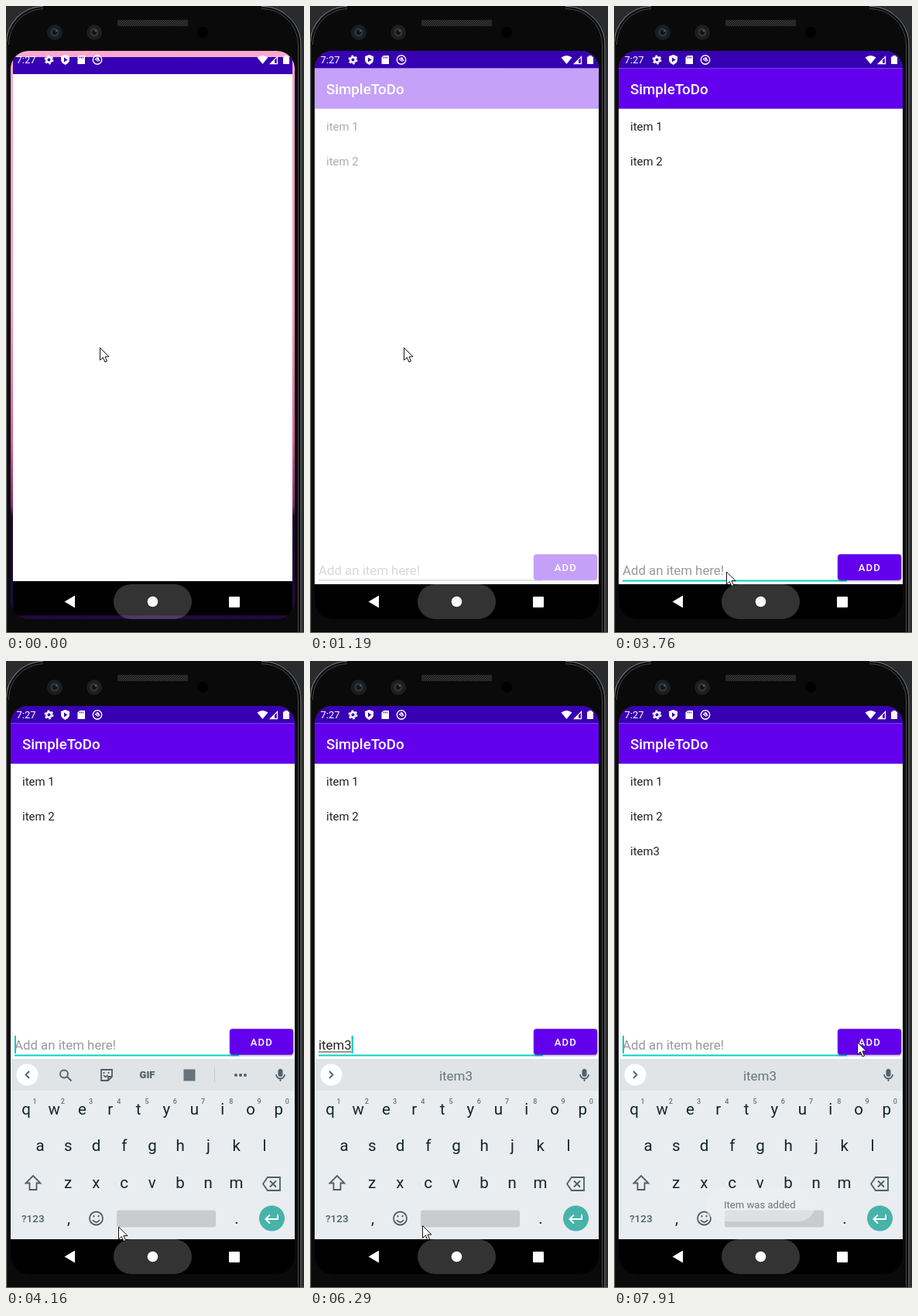
Animation of 385 by 810 pixels, one loop 8000 ms. Source, as an HTML page:

```html
<!DOCTYPE html>
<html lang="en">
<head>
<meta charset="utf-8">
<title>To-do app demo</title>
<style>
html, body { margin: 0; width: 100%; height: 100%; overflow: hidden; background: #0a0a0a; }
svg { display: block; width: 385px; height: 810px; }
text { font-family: Roboto, "Noto Sans", sans-serif; white-space: pre; }
.mid { text-anchor: middle; }
.item { font-size: 14.95px; fill: #212121; }
.field { font-size: 16.82px; }
.small { font-size: 13.08px; }
.key { font-size: 20.5px; fill: #14242d; }
.num { font-size: 9px; font-weight: 500; fill: #66737a; }
.sug { font-size: 17px; fill: #66737a; }
.line { fill: none; stroke: #505f68; stroke-width: 1.8; }
</style>
</head>
<body>
<svg viewBox="0 0 385 810">
  <defs>
    <clipPath id="screen"><rect x="6" y="58" width="367" height="734" rx="23"/></clipPath>
    <clipPath id="app"><rect x="6" y="80" width="367" height="667"/></clipPath>
    <linearGradient id="wall" x1="0" y1="0" x2="0" y2="1">
      <stop offset="0" stop-color="#f8a9d0"/><stop offset=".45" stop-color="#f79ac0"/>
      <stop offset=".68" stop-color="#e0609a"/><stop offset=".8" stop-color="#8c2b7c"/>
      <stop offset=".82" stop-color="#1b0b3c"/><stop offset="1" stop-color="#220840"/>
    </linearGradient>
    <pattern id="mesh" width="3" height="3" patternUnits="userSpaceOnUse">
      <rect width="3" height="3" fill="#1c1c1c"/><path d="M0 3L3 0" stroke="#414141"/>
    </pattern>
    <filter id="shadow" x="-10%" y="-20%" width="120%" height="150%">
      <feDropShadow dx="0" dy="1.2" stdDeviation="1" flood-opacity=".35"/>
    </filter>
  </defs>

  <!-- phone body -->
  <rect width="385" height="810" fill="#0a0a0a"/>
  <path d="M0 0H48A48 48 0 0 0 0 48ZM330 0H385V810H382V50A50 50 0 0 0 330 0Z" fill="#292b2d"/>
  <g fill="none">
    <path d="M.5 810V50A48 48 0 0 1 48 .5M330 .5A50 50 0 0 1 381 50V810" stroke="#6c6e70" stroke-width="1.3"/>
    <path d="M3.500 50A46 46 0 0 1 48 3.500M330 3.500A47 47 0 0 1 377.500 50V810" stroke="#48494b"/>
    <path d="M0 809.500H385" stroke="#6c6e70"/>
  </g>
  <g id="lenses"></g>
  <circle cx="254" cy="34" r="7" fill="#000"/>
  <rect x="144" y="18" width="91" height="8" fill="url(#mesh)"/>

  <g clip-path="url(#screen)">
    <rect x="6" y="58" width="367" height="734" fill="url(#wall)"/>
    <g id="window">
      <rect x="6" y="58" width="367" height="734"/>
      <rect x="6" y="80" width="367" height="667" fill="#fff"/>
      <rect x="6" y="58" width="367" height="22.400" fill="#3700b3"/>
    </g>

    <g id="content" clip-path="url(#app)">
      <rect x="6" y="80.400" width="367" height="52.300" fill="#6200ee"/>
      <text x="21" y="113.500" font-size="18.690" font-weight="500" fill="#fff">SimpleToDo</text>
      <text class="item" x="21" y="161">item 1</text>
      <text class="item" x="21" y="206">item 2</text>
      <text class="item" x="21" y="251" id="added">item3</text>
      <g id="entry">
        <rect id="rule" x="11" width="290"/>
        <text class="field" id="hint" x="11" y="735" fill="#999">Add an item here!</text>
        <text class="field" id="typed" x="11" y="735" fill="#212121"></text>
        <rect id="under" x="11" y="737.500" height="1" fill="#333"/>
        <rect id="caret" y="717" width="2" height="23" fill="#03c9b8"/>
        <rect id="button" x="289" y="708.200" width="82.200" height="33.600" rx="3.700" filter="url(#shadow)"/>
        <text class="small" x="315.700" y="730" font-weight="500" letter-spacing="1.170" fill="#fff">ADD</text>
      </g>

      <g id="keyboard">
        <rect x="6" y="514" width="367" height="233" fill="#e9edf0"/>
        <rect x="6" y="514" width="367" height="41" fill="#e0e4e6"/>
        <circle cx="27.500" cy="534.500" r="14" fill="#fff"/>
        <path id="chevron" class="line"/>
        <g id="tools">
          <path class="line" d="M79 537L84.500 542.500M80 533.500a5 5 0 1 0-10 0a5 5 0 0 0 10 0"/>
          <path class="line" stroke-width="1.5" d="M123 528H137V537L132 542H123ZM132 542V537H137M126 535Q129 539 131 535M126.500 531v2M132.500 531v2"/>
          <text class="mid" x="182.500" y="539" font-size="13" font-weight="900" fill="#505f68">GIF</text>
          <rect x="229.500" y="527.500" width="15" height="15" fill="#66737a"/>
          <path d="M269.500 525V545" stroke="#c8cdd0"/>
          <path d="M297 535h.01M303 535h.01M309 535h.01" stroke="#505f68" stroke-width="4" stroke-linecap="round"/>
        </g>
        <g id="suggest">
          <path id="split" d="M140.500 525V545M236.500 525V545" stroke="#c8cdd0"/>
          <text class="sug mid" x="92" y="541.500"></text>
          <text class="sug mid" x="188.500" y="541.500"></text>
          <text class="sug mid" x="285" y="541.500"></text>
        </g>
        <rect x="351.500" y="527" width="6" height="10" rx="3" fill="#505f68"/>
        <path class="line" stroke-width="1.5" d="M349 534a5.500 5.500 0 0 0 11 0M354.500 539.500V543"/>
        <g id="keys"></g>
        <path class="line" d="M35 665L44.500 674.500H39.500V683H30.500V674.500H25.500Z"/>
        <path class="line" d="M338 667H354V684H338L332 675.500ZM341 671.500l8 8M349 671.500l-8 8"/>
        <text x="20" y="725" font-size="13.500" font-weight="500" fill="#505f68">?123</text>
        <text class="key mid" x="81" y="727">,</text>
        <text class="key mid" x="298" y="727">.</text>
        <circle class="line" cx="116.500" cy="720" r="8.500"/>
        <path class="line" d="M112 722Q116.500 728 121 722M113.500 716v2.500M119.500 716v2.500"/>
        <rect x="143" y="709.500" width="128" height="22" rx="3" fill="#c8ccce"/>
        <circle cx="343.500" cy="720" r="16.500" fill="#47b3a9"/>
        <path d="M351 715V721H336M341 715.500L335.500 721L341 726.500" fill="none" stroke="#fff" stroke-width="2"/>
      </g>
    </g>

    <!-- system bars -->
    <g fill="#fff">
      <text class="small" x="13.500" y="74">7:27</text>
      <circle cx="55.500" cy="69.500" r="3.300" fill="none" stroke="#fff" stroke-width="2.600"/>
      <circle cx="55.500" cy="69.500" r="5.200" fill="none" stroke="#fff" stroke-width="1.600" stroke-dasharray="2.700 2.745"/>
      <path d="M76.500 63L82 65V69.500Q81.500 74 76.500 76Q71.500 74 71 69.500V65Z"/>
      <path d="M75 66.500V72.500L79.500 69.500Z" fill="#3700b3"/>
      <path d="M95 64H102V75H92.500V66.500Z"/>
      <path d="M95.500 65.500v2M97.500 65.500v2M99.500 65.500v2" stroke="#3700b3"/>
      <circle cx="118" cy="69.500" r="5.700" fill="none" stroke="#fff" stroke-width="1.400"/>
      <path d="M114.500 69Q116 65.500 119.500 66.500L121.500 71L119 72Z"/><path d="M115 66.500L121 72.500" stroke="#3700b3"/>
      <path d="M324.500 66.500Q331.500 61.500 338.500 66.500L331.500 75Z"/>
      <path d="M341.500 74.500H350.500V65.500Z" fill="none" stroke="#fff" stroke-width="1.300"/><path d="M341 75L347 69V75Z"/>
      <path d="M358 65.500H360V64H364V65.500H366V75H358Z"/>
      <rect x="139" y="747" width="101" height="45" rx="22.500" opacity=".2"/>
      <path d="M75.500 769.500L89 761.500V777.500Z"/>
      <circle cx="189.500" cy="769.500" r="6.800"/>
      <rect x="288" y="763" width="14" height="14" rx="1"/>
    </g>
    <g id="toast">
      <rect x="118" y="681" width="142" height="43" rx="21.500" fill="#eeeff0"/>
      <text class="small" x="142" y="707" fill="#222">Item was added</text>
    </g>
  </g>
  <path id="mouse" d="M.5 .5V16.500L4.300 13L7 19L9.500 18L7 12H12Z" fill="#fff" stroke="#111"/>
</svg>
<script>
const $ = id => document.getElementById(id);
const LOOP = 8000;

$('lenses').innerHTML = [63, 114].map(x =>
  `<circle cx="${x}" cy="34" r="10" fill="#1b1f22"/><circle cx="${x}" cy="34" r="5.500" fill="#30363a"/>
   <circle cx="${x}" cy="34" r="3" fill="#111416"/><circle cx="${x + 2}" cy="32" r="1.200" fill="#596167"/>`).join('');

$('keys').innerHTML = [['qwertyuiop', 26, 586], ['asdfghjkl', 44, 633], ['zxcvbnm', 80, 681]]
  .map(([row, x0, y], r) => [...row].map((c, i) => {
    const x = x0 + i * 36.25;
    return `<text class="key mid" x="${x}" y="${y}">${c}</text>` +
      (r ? '' : `<text class="num mid" x="${x + 11}" y="572">${(i + 1) % 10}</text>`);
  }).join('')).join('');

// Each track lists [start time, value...]; values hold until the next start.
const mouse = [[0, 121, 441], [1590, 150, 498], [1890, 150, 600], [2020, 150, 669], [2140, 148, 708],
  [2260, 146, 722], [2380, 145, 725], [3460, 145, 727], [3610, 145, 728], [3760, 145, 730.5],
  [6170, 145, 729], [6540, 161, 701], [6690, 208, 630], [6810, 251, 552], [6950, 276, 525],
  [7070, 296, 506], [7190, 308, 496], [7310, 314, 492]];
const blink = [[0, 0], [3030, 1], [3610, 0], [4040, 1], [5250, 0], [5500, 1], [6050, 0], [6170, 1], [6690, 0], [7190, 1]];
const typing = [[0, ''], [4410, 'i'], [4660, 'it'], [5500, 'item'], [6170, 'item3'], [7670, '']];
const words = [[0], [4410, 'in', 'i', 'is'], [4660, 'its', 'it', "it's"],
  [5500, 'items', 'item', 'itemized'], [6170, '', 'item3', '']];
const fade = [[0, 0], [1190, .37], [1310, 1]];
const press = [[0, '#6200ee'], [7430, '#751fee'], [7550, '#8438f2'], [7670, '#751fee'], [7790, '#6200ee']];
const toast = [[0, 0], [7790, .2], [7910, .6]];

const at = (track, t) => track.findLast(k => k[0] <= t).slice(1);
const show = (id, on) => $(id).style.display = on ? '' : 'none';
const set = (id, attrs) => { for (const k in attrs) $(id).setAttribute(k, attrs[k]); };

function draw(t) {
  set('window', { transform: t < 120 ? 'translate(9 66) scale(.9837 .9826) translate(-6 -58)' : '' });
  set('content', { opacity: at(fade, t)[0] });

  const open = t >= 4040, focus = t >= 2510;
  set('entry', { transform: `translate(0 ${open ? -233 : 0})` });
  set('rule', { y: focus ? 741.5 : 741, height: focus ? 2 : 1.5, fill: focus ? '#03d3c2' : '#999' });
  show('keyboard', open);
  set('keyboard', { transform: `translate(0 ${t < 4160 ? 24 : 0})` });

  const [text] = at(typing, t);
  $('typed').textContent = text;
  const width = text ? $('typed').getComputedTextLength() : 0;
  set('under', { width });
  set('caret', { x: 11 + width });
  show('caret', at(blink, t)[0]);
  show('hint', !text);

  const list = at(words, t), hasWords = list.length > 0;
  show('tools', !hasWords);
  show('suggest', hasWords);
  show('split', list[0]);
  document.querySelectorAll('.sug').forEach((el, i) => el.textContent = list[i] || '');
  set('chevron', { d: hasWords ? 'M25 530L29.500 534.500L25 539' : 'M30 530L25.500 534.500L30 539' });

  set('button', { fill: at(press, t)[0] });
  show('added', t >= 7790);
  set('toast', { opacity: at(toast, t)[0] });
  set('mouse', { transform: `translate(${at(mouse, t)})` });
}

const start = performance.now();
function tick(now) {
  draw(Math.max(0, now - start) % LOOP);
  requestAnimationFrame(tick);
}
draw(0);
requestAnimationFrame(tick);
</script>
</body>
</html>
```
